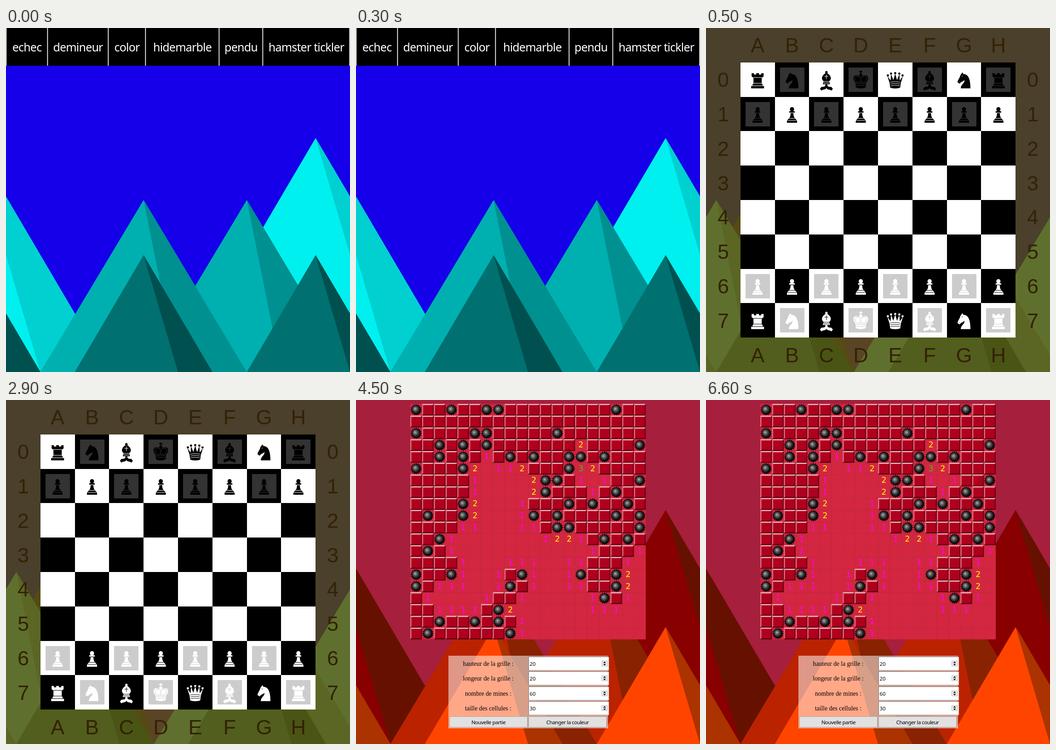
Write an HTML page with a canvas that moves like this. It is 748 px wide and 748 px high and loops after 8000 ms.

```html
<!DOCTYPE html>
<html lang="fr">
<head>
<meta charset="utf-8">
<title>Jeux</title>
<style>
html, body { margin: 0; width: 100%; height: 100%; overflow: hidden; background: #000; }
canvas { display: block; width: 100%; height: 100%; }
</style>
</head>
<body>
<canvas id="stage" width="748" height="748"></canvas>
<script>
const S = 748, LOOP = 8000;
const ctx = document.getElementById('stage').getContext('2d');

function rect(x, y, w, h, color) {
  ctx.fillStyle = color;
  ctx.fillRect(x, y, w, h);
}

function poly(color, ...pts) {
  ctx.fillStyle = color;
  ctx.beginPath();
  for (let i = 0; i < pts.length; i += 2) ctx.lineTo(pts[i], pts[i + 1]);
  ctx.fill();
}

function text(str, x, y, font, color, align = 'center', spacing = 0) {
  ctx.font = font;
  ctx.fillStyle = color;
  ctx.textAlign = align;
  ctx.letterSpacing = spacing + 'px';
  ctx.fillText(str, x, y);
}

// Mountains, back to front, in fractions of the stage: peak x, height, half width, shade offset
const PEAKS = [
  [0.9, 0.68, 0.4, 0.2, 'back'],
  [0.7, 0.5, 0.3, 0.1, 'mid'],
  [0.4, 0.5, 0.3, 0.1, 'mid'],
  [0.4, 0.34, 0.2, 0.1, 'front'],
  [0.9, 0.34, 0.2, 0.1, 'front']
];

const SEA = { sky: '#1500e9', back: ['#00f0f0', '#00d0d0'], mid: ['#00b0b0', '#009090'], front: ['#007070', '#005050'] };
const MOSS = { sky: '#4a402b', back: ['#564a15', '#5a4426'], mid: ['#5f702e', '#5b6625'], front: ['#525e1d', '#4a5414'] };
const LAVA = { sky: '#a61f3c', back: ['#880000', '#661100'], mid: ['#bb2200', '#882200'], front: ['#ff4400', '#aa3300'] };

function mountains(colors, shift) {
  rect(0, 0, S, S, colors.sky);
  for (const [px, h, half, shade, layer] of PEAKS) {
    const [light, dark] = colors[layer];
    for (const turn of [-1, 0, 1]) {
      const x = (px + shift + turn) * S, top = (1 - h) * S;
      poly(light, x, top, x - half * S, S, x + half * S, S);
      poly(dark, x, top, x + shade * S, S, x + half * S, S);
    }
  }
}

// Menu
const EDGES = [0, 90, 222, 303, 463, 558, 747];
const GAMES = ['echec', 'demineur', 'color', 'hidemarble', 'pendu', 'hamster tickler'];

function drawMenu() {
  mountains(SEA, 0);
  rect(0, 0, S, 82, '#000');
  EDGES.forEach(x => rect(x - 0.5, 0, 1.7, 82, '#fff'));
  GAMES.forEach((name, i) => {
    text(name, (EDGES[i] + EDGES[i + 1]) / 2 + 0.5, 51, '25px "Noto Sans", sans-serif', '#fff', 'center', -0.8);
  });
}

// Chess: each piece has a filled outline and thin cut lines, centred on its cell
const BASE = 'M-11 11H11V14H14V19H-14V14H-11Z';
const PIECES = {
  rook: [
    'M-13 -14H-8V-11H-3V-14H3V-11H8V-14H13V-7L9 -4V8L11 11H-11L-9 8V-4L-13 -7Z' + BASE,
    'M-9 -4.5H9M-9 8H9M-11 13.5H11'
  ],
  knight: [
    'M-4 -16L-1 -12C9 -12 14 -2 14 19H-7C-7 10 2 8 1 1C-3 5 -7 4 -9 9L-14 6C-14 1 -9 -4 -8 -9C-7 -12 -5 -12 -4 -16Z',
    'M-5 -7L-3 -8M-11 5L-10 4'
  ],
  bishop: [
    'M0 -19A3 3 0 0 1 2 -14C8 -10 11 -5 9 0L6 4L8 10H-8L-6 4L-9 0C-11 -5 -8 -10 -2 -14A3 3 0 0 1 0 -19Z' +
    'M-2 10H2C2 17 7 15 11 16L14 20L11 24C6 20 2 23 0 18C-2 23 -6 20 -11 24L-14 20L-11 16C-7 15 -2 17 -2 10Z',
    'M0 -11V-1M-4 -7H4M-7 4H7M-6 7.5H6'
  ],
  king: [
    'M-1 -20H1V-18H4V-16H1V-13C4 -12 4 -9 3 -7C8 -11 16 -10 16 -3C16 2 12 5 11 9V16C8 20 -8 20 -11 16V9' +
    'C-12 5 -16 2 -16 -3C-16 -10 -8 -11 -3 -7C-4 -9 -4 -12 -1 -13V-16H-4V-18H-1Z',
    'M0 5V-4C3 -8 13 -9 13 -3C13 1 10 3 9 7C5 5 -5 5 -9 7C-10 3 -13 1 -13 -3C-13 -9 -3 -8 0 -4M-10 10C-5 8 5 8 10 10M-10 14C-5 12 5 12 10 14'
  ],
  queen: [
    'M-17 -8L-10 2L-9 -12L-4 1L0 -13L4 1L9 -12L10 2L17 -8L12 8L11 17C7 20 -7 20 -11 17L-12 8Z' +
    [[-16, -9], [-9, -13], [0, -14], [9, -13], [16, -9]]
      .map(([x, y]) => `M${x - 2.4} ${y}a2.4 2.4 0 1 0 4.8 0a2.4 2.4 0 1 0 -4.8 0Z`).join(''),
    'M-11 6C-5 4 5 4 11 6M-10 10C-5 8 5 8 10 10M-10 14C-5 12 5 12 10 14'
  ],
  pawn: [
    'M-4.5 -10.5A4.5 4.5 0 1 1 4.5 -10.5C4.5 -8.5 3.5 -7 2.5 -6H6V-3H3C3 3 4 6 6 9L9 12L11 16V19H-11V16L-9 12L-6 9' +
    'C-4 6 -3 3 -3 -3H-6V-6H-2.5C-3.5 -7 -4.5 -8.5 -4.5 -10.5Z',
    'M-3 -2.5H3M-6 9.5H6M-9 14H9'
  ]
};
for (const key in PIECES) PIECES[key] = PIECES[key].map(d => new Path2D(d));
const RANK = ['rook', 'knight', 'bishop', 'king', 'queen', 'bishop', 'knight', 'rook'];

function drawPiece(kind, x, y, color, under) {
  const [body, cuts] = PIECES[kind];
  ctx.save();
  ctx.translate(x, y);
  ctx.fillStyle = color;
  ctx.fill(body);
  ctx.strokeStyle = under;
  ctx.lineWidth = 1;
  ctx.stroke(cuts);
  ctx.restore();
}

function drawChess() {
  mountains(MOSS, 0.33);
  const cell = S / 10, edge = i => Math.round((i + 1) * cell);
  const font = '45px "Liberation Sans", Arial, sans-serif';
  for (let i = 0; i < 8; i++) {
    const mid = (i + 1.5) * cell;
    for (const side of [cell / 2, S - cell / 2]) {
      text('ABCDEFGH'[i], mid, side + 16, font, '#332206');
      text(String(i), side, mid + 16, font, '#332206');
    }
  }
  for (let r = 0; r < 8; r++) {
    for (let c = 0; c < 8; c++) {
      const white = (r + c) % 2 === 0;
      const x = edge(c), y = edge(r);
      let under = white ? '#fff' : '#000';
      rect(x, y, edge(c + 1) - x, edge(r + 1) - y, under);
      if (r > 1 && r < 6) continue;
      const whitePiece = r > 5;
      if (white === whitePiece) {
        under = white ? '#ccc' : '#333';
        rect(x + 11, y + 11, 53, 53, under);
      }
      const kind = r === 0 || r === 7 ? RANK[c] : 'pawn';
      drawPiece(kind, (c + 1.5) * cell, (r + 1.5) * cell, whitePiece ? '#fff' : '#000', under);
    }
  }
}

// Minesweeper: # closed, * mine, . empty
const FIELD = [
  '*##*##**#########*##',
  '####################',
  '*####**#####*#######',
  '##*#*#*#######2####*',
  '##*#*#1#*#*##**#*###',
  '*###*2.112###*32####',
  '#####1....2**#1.1##*',
  '#####1....2*###1#*##',
  '####*2...1###*#*##*#',
  '#*##*2...1*#*####*#*',
  '####11...11#**#####*',
  '##*1.......1221#*#*#',
  '#*#1...........1###1',
  '####1...111..11###1.',
  '*##*1..1#*1..1*##*2.',
  '*#111..1*#1..11##*2.',
  '#1....1##1.....1*#1.',
  '##1111#*2......111..',
  '##*##*#*#1..........',
  '#*######*1..........'
];
const DIGITS = { 1: '#ff00ff', 2: '#ffff00', 3: '#22cc22' };
const CELL = 25.6, LEFT = 118, TOP = 8.5;

function drawClosed(x, y) {
  const b = 2.5, r = x + CELL, d = y + CELL;
  rect(x, y, CELL, CELL, '#b0001e');
  poly('#d9707e', x, y, x + b, y + b, x + b, d - b, x, d);
  poly('#f0b8c0', x, y, r, y, r - b, y + b, x + b, y + b);
  poly('#6e0014', r, y, r, d, r - b, d - b, r - b, y + b);
  poly('#5c0010', x, d, x + b, d - b, r - b, d - b, r, d);
}

function drawMine(x, y) {
  ctx.fillStyle = '#0a0a0a';
  ctx.beginPath();
  for (let i = 0; i < 32; i++) {
    const a = i * Math.PI / 16, r = i % 2 ? 9.8 : 12.8;
    ctx.lineTo(x + r * Math.cos(a), y + r * Math.sin(a));
  }
  ctx.fill();
  const g = ctx.createRadialGradient(x - 2.5, y - 2.5, 0, x - 1, y - 1, 10);
  g.addColorStop(0, '#b4b4b4');
  g.addColorStop(0.35, '#686868');
  g.addColorStop(0.7, '#2c2c2c');
  g.addColorStop(1, '#060606');
  ctx.fillStyle = g;
  ctx.beginPath();
  ctx.arc(x, y, 9.8, 0, 7);
  ctx.fill();
}

function drawField() {
  rect(LEFT, TOP, 20 * CELL, 20 * CELL, '#d42640');
  FIELD.forEach((row, r) => [...row].forEach((mark, c) => {
    const x = LEFT + c * CELL, y = TOP + r * CELL;
    if (mark === '#') return drawClosed(x, y);
    rect(x, y, CELL, 0.85, '#b92a42');
    rect(x, y, 0.85, CELL, '#b92a42');
    if (mark === '*') drawMine(x + CELL / 2, y + CELL / 2);
    else if (mark !== '.') text(mark, x + CELL / 2, y + 18, '17px "DejaVu Sans", sans-serif', DIGITS[mark]);
  }));
}

const OPTIONS = [
  ['hauteur de la grille :', '20'],
  ['longeur de la grille :', '20'],
  ['nombre de mines :', '60'],
  ['taille des cellules :', '30']
];
const UI = '11.4px "Noto Sans", sans-serif';

function drawInput(y, value) {
  rect(375, y, 175, 30, '#7a7a7a');
  rect(376, y + 1, 174, 29, '#d8d8d8');
  rect(376, y + 1, 172.5, 27.5, '#fff');
  text(value, 377.5, y + 20, UI, '#000', 'left');
  rect(534, y + 9, 13, 12, '#b8b8b8');
  rect(535, y + 10, 11, 10, '#eee');
  poly('#111', 537.5, y + 14, 540.5, y + 10.5, 543.5, y + 14);
  poly('#111', 537.5, y + 16, 540.5, y + 19.5, 543.5, y + 16);
}

function drawButton(x, w, label) {
  rect(x, 688, w, 24, '#adadad');
  rect(x + 1, 689, w - 2, 22, '#e1e1e1');
  text(label, x + w / 2, 705, UI, '#000', 'center', -0.5);
}

function drawMines() {
  mountains(LAVA, 0);
  drawField();
  rect(201, 556, 347, 158, 'rgba(255,255,255,0.53)');
  OPTIONS.forEach(([label, value], i) => {
    const y = Math.round(558 + i * 32.4);
    text(label, 287.5, y + 20, '13.65px "Liberation Serif", Times, serif', '#000');
    drawInput(y, value);
  });
  drawButton(203, 170, 'Nouvelle partie');
  drawButton(375, 170, 'Changer la couleur');
}

const SCENES = [[0, drawMenu], [500, drawChess], [4500, drawMines]];
const start = performance.now();
let shown = null;

function tick() {
  const t = (performance.now() - start) % LOOP;
  const draw = SCENES.filter(([from]) => t >= from).pop()[1];
  if (draw !== shown) {
    draw();
    shown = draw;
  }
  requestAnimationFrame(tick);
}
tick();
</script>
</body>
</html>
```
